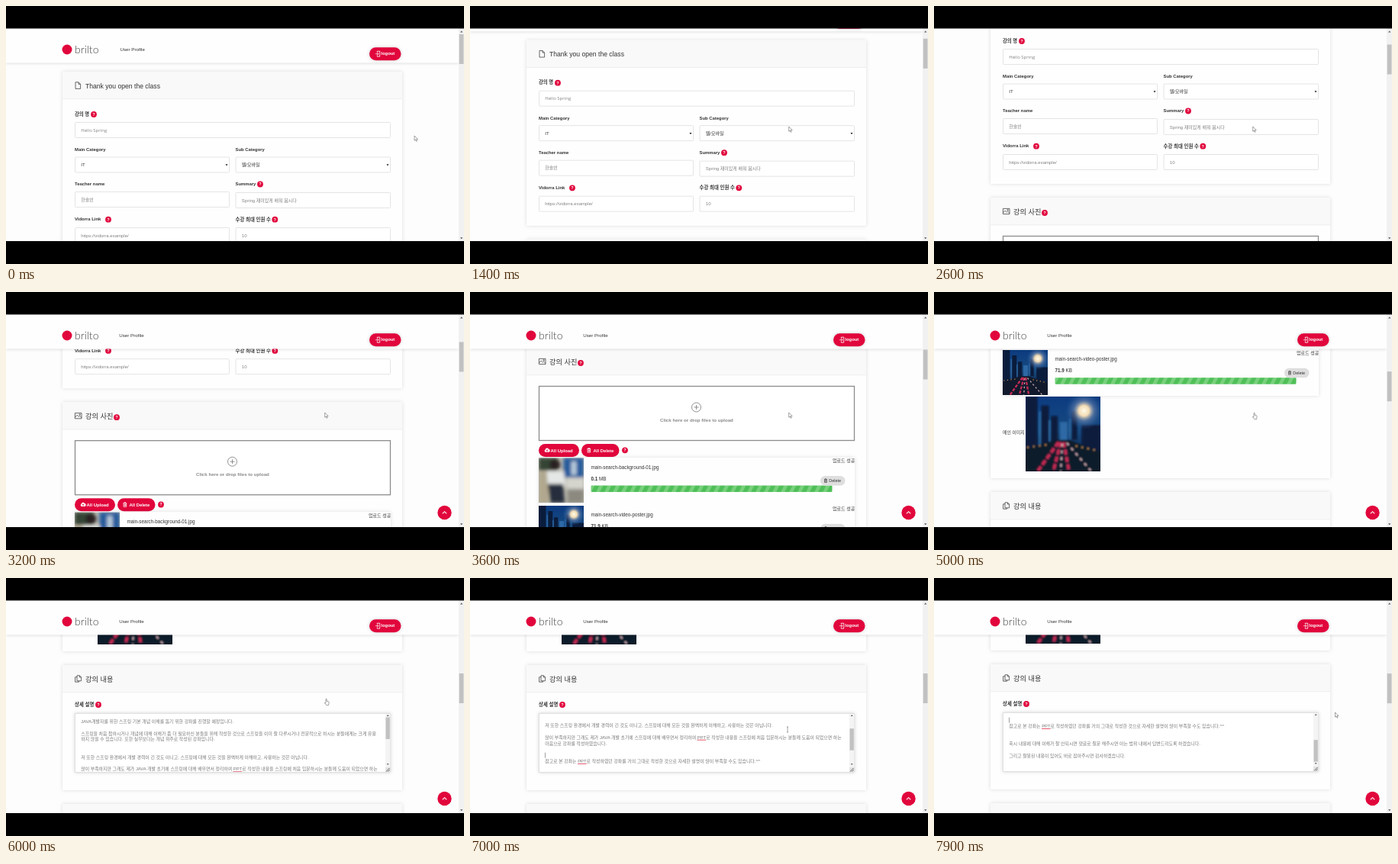
Recreate the animation shown at these times as an HTML page. Size 600 px wide and 338 px high, loop 8000 ms.

```html
<!DOCTYPE html>
<html lang="ko">
<head>
<meta charset="utf-8">
<title>Class form</title>
<style>
  html, body { margin: 0; width: 100%; height: 100%; overflow: hidden; background: #000; }
  svg { display: block; width: 600px; height: 338px; }
  text { font-family: "Liberation Sans", "Noto Sans CJK KR", "Noto Sans CJK", sans-serif; white-space: pre; }
  .card { fill: #fefefe; filter: drop-shadow(0 0 2.5px rgba(0, 0, 0, .13)); }
  .bar { filter: drop-shadow(0 0 2px rgba(0, 0, 0, .18)); }
  .line { fill: none; stroke: #444; stroke-width: .8; }
  .white { fill: none; stroke: #fff; stroke-width: .8; }
  .pointer path { fill: #fff; stroke: #666; stroke-width: .6; stroke-linejoin: round; }
</style>
</head>
<body>
<svg id="stage" viewBox="0 0 600 338"></svg>
<script>
const RED = '#e1063c', INK = '#333', GREY = '#808080';

// Building blocks: y of a text is its vertical middle.
const text = (x, y, str, size = 6.3, fill = INK, extra = '') =>
  `<text x="${x}" y="${y + size * .35}" font-size="${size}" fill="${fill}" ${extra}>${str}</text>`;
const bold = (x, y, str, size = 5.9, fill = INK) => text(x, y, str, size, fill, 'font-weight="700"');
const rect = (x, y, w, h, fill, extra = '') =>
  `<rect x="${x}" y="${y}" width="${w}" height="${h}" fill="${fill}" ${extra}/>`;
const path = (d, cls, extra = '') => `<path d="${d}" class="${cls}" ${extra}/>`;
const at = (x, y, body) => `<g transform="translate(${x} ${y})">${body}</g>`;
const help = (x, y) => `<circle cx="${x}" cy="${y}" r="3.9" fill="${RED}"/>` +
  text(x, y, '?', 5.6, '#fff', 'font-weight="700" text-anchor="middle"');
const box = (x, y, w, value, fill = GREY, font = '') =>
  rect(x + .5, y + .5, w - 1, 20, '#fff', 'rx="1" stroke="#dedede" stroke-width=".8"') +
  text(x + 8.3, y + 10.5, value, 6, fill, font);
const select = (x, y, w, value) =>
  box(x, y, w, value, INK) + path(`M${x + w - 5.5} ${y + 9.8}h3l-1.5 2.2z`, '', 'fill="#222"');
const card = (y, h, icon, title, size) =>
  rect(74, y, 445, h, '', 'class="card" rx="1"') + rect(74, y, 445, 36, '#f9f9f9') +
  rect(74, y + 35.5, 445, .7, '#e9e9e9') + at(90, y + 18, icon) + text(104, y + 18.5, title, size);
const pill = (x, y, w, label, icon) =>
  rect(x, y, w, 17, RED, 'rx="8.5"') + at(x + 7.5, y + 8.5, icon) + bold(x + 15.5, y + 8.5, label, 5.9, '#fff');

const trash = cls => path('M0-2h4.6M1.5-2v-1h1.6v1M.6-2v4.6h3.4v-4.6M1.8-.8v2.2M2.9-.8v2.2', cls);
const page = path('M1-4.2h4l2.6 2.6v6h-6.6zM5-4.2v2.6h2.6', 'line');
const picture = path('M.4-3.6h8.6v7.2h-8.6zM.4 2l2.8-3 2.2 2.2 1.2-1 2.4 2.2', 'line') +
  '<circle cx="6.6" cy="-1.6" r=".8" class="line"/>';
const pages = path('M3-4.2h3.4l2.2 2.2v4.8h-5.6zM6.4-4.2v2.2h2.2M3-2.2h-2.4v6.4h5v-1.4', 'line');
const cloud = path('M1.4 2.2a1.7 1.7 0 0 1-.2-3.2 2.3 2.3 0 0 1 4.3-.7 2 2 0 0 1 .3 3.9z', '', 'fill="#fff"') +
  path('M3.5 1.8v-2.6M2.5.2l1-1 1 1', 'line', `style="stroke:${RED}"`);

const defs = `<defs>
  <pattern id="stripes" width="11" height="9" patternUnits="userSpaceOnUse" y="527">
    <rect width="11" height="9" fill="#4fbf58"/><path d="M4.5 0h5L5 9H0z" fill="#78d07c"/></pattern>
  <linearGradient id="dusk" x2="0" y2="1"><stop stop-color="#0c3b80"/>
    <stop offset=".45" stop-color="#174a80"/><stop offset="1" stop-color="#0a1428"/></linearGradient>
  <radialGradient id="lamp"><stop stop-color="#fffbe8"/><stop offset=".28" stop-color="#f3dcb4"/>
    <stop offset=".55" stop-color="#7189b0" stop-opacity=".6"/><stop offset="1" stop-color="#2a5c9e" stop-opacity="0"/></radialGradient>
  <filter id="soft"><feGaussianBlur stdDeviation="1.3"/></filter>
  <filter id="blur"><feGaussianBlur stdDeviation="4"/></filter>
  <clipPath id="note"><rect x="91" y="804" width="405" height="76"/></clipPath>
  <symbol id="city" viewBox="0 0 100 100">
    <rect width="100" height="100" fill="url(#dusk)"/>
    <g filter="url(#soft)">
      <path d="M0 0h16v72H0zM21 12h10v55H21zM34 26h9v36h-9zM62 20h7v38h-7zM75 38h25v40H75z" fill="#0a1c3c"/>
      <path d="M46 34h10v26H46z" fill="#2d69a5"/>
      <path d="M19 20v44M32 32v28M59 30v27" stroke="#3a78b2" stroke-width="1.5"/>
      <path d="M0 70L40 58H58L100 74V100H0z" fill="#111a2c"/>
      <path d="M44 61L16 100M47 61L37 100M51 61L58 100" stroke="#c42b55" stroke-width="4" stroke-dasharray="7 3"/>
      <path d="M55 62L88 100M49 63L47 100" stroke="#d8b6bd" stroke-width="2" stroke-dasharray="4 5"/>
      <path d="M2 68l30-4M67 66l28 6" stroke="#d89a50" stroke-width="2" stroke-dasharray="2 6"/>
    </g>
    <circle cx="78" cy="19" r="25" fill="url(#lamp)"/>
  </symbol>
  <symbol id="people" viewBox="0 0 100 100">
    <rect width="100" height="100" fill="#b9b8ae"/>
    <g filter="url(#blur)">
      <path d="M0 0h42v28H0z" fill="#344434"/><path d="M55 0h45v44H55z" fill="#265c9c"/>
      <path d="M72 8h12v30H72z" fill="#b9cbd9"/><path d="M0 30h22v70H0z" fill="#b1a78e"/>
      <circle cx="36" cy="15" r="12" fill="#292321"/><path d="M18 30h38l4 32H20z" fill="#e5e7e6"/>
      <path d="M20 58h34l4 42H26z" fill="#252d3e"/><path d="M62 44h38v24H62z" fill="#d5d4cd"/>
      <path d="M64 70h36v30H64z" fill="#8c8a80"/>
    </g>
  </symbol>
</defs>`;

const fileRow = (y, image, name, size, unit) =>
  `<use href="#${image}" x="90" y="${y}" width="59" height="59"/>` +
  text(158.5, y + 12, name) +
  text(158.5, y + 27, `<tspan font-weight="700">${size}</tspan> ${unit}`) +
  at(0, y - 491, rect(158.5, 527.2, 316, 8.6, 'url(#stripes)', 'rx="1"')) +
  text(475, y + 4, '업로드 성공', 6) +
  rect(459, y + 23.7, 32.5, 12.6, '#dedede', 'rx="6.3"') +
  at(464, y + 30, `<g transform="scale(.85)">${trash('line')}</g>`) + text(470.3, y + 30, 'Delete', 5.4);

const noteLines = [
  [0, 'JAVA개발자를 위한 스프링 기본 개념 이해를 돕기 위한 강좌를 진행할 예정입니다.'],
  [2, '스프링을 처음 접하시거나 개념에 대해 이해가 좀 더 필요하신 분들을 위해 작성한 것으로 스프링을 이미 잘 다루시거나 전문적으로 하시는 분들에게는 크게 유용'],
  [3, '하지 않을 수 있습니다. 또한 실무보다는 개념 위주로 작성된 강좌입니다.'],
  [6, '저 또한 스프링 환경에서 개발 경력이 긴 것도 아니고, 스프링에 대해 모든 것을 완벽하게 이해하고, 사용하는 것은 아닙니다.'],
  [8, '많이 부족하지만 그래도 제가 JAVA 개발 초기에 스프링에 대해 배우면서 정리하여 PPT로 작성한 내용을 스프링에 처음 입문하시는 분들께 도움이 되었으면 하는'],
  [9, '마음으로 강좌를 작성하였습니다.'],
  [12, '참고로 본 강좌는 PPT로 작성하였던 강좌를 거의 그대로 작성한 것으로 자세한 설명이 많이 부족할 수도 있습니다.^^'],
  [15, '혹시 내용에 대해 이해가 잘 안되시면 댓글로 질문 해주시면 아는 범위 내에서 답변드리도록 하겠습니다.'],
  [17, '그리고 잘못된 내용이 있어도 바로 잡아주시면 감사하겠습니다.'],
];
const lineY = n => 814 + n * 7.8;
const noteText = noteLines.map(([n, str]) => text(98.3, lineY(n), str, 5.9, '#777')).join('') +
  rect(297.5, lineY(8) + 3, 11.5, .8, '#e0304a') + rect(141, lineY(12) + 3, 11.5, .8, '#e0304a') +
  rect(98.3, lineY(11) - 3.5, .7, 7, '#777');

const openSans = 'style="font-family:\'Open Sans\',sans-serif"';
const content =
  card(86, 243, page, 'Thank you open the class', 8.6) +
  bold(90, 141.5, '강의 명', 6.3) + help(115, 142) + box(90, 152, 414, 'Hello Spring', GREY, openSans) +
  bold(90, 188, 'Main Category') + select(90, 197.5, 203, 'IT') +
  bold(300.5, 188, 'Sub Category') + select(300.5, 197.5, 203.5, '웹/모바일') +
  bold(90, 233.3, 'Teacher name') + box(90, 243, 203, '한솔빈') +
  bold(300.5, 233.3, 'Summary') + help(333, 233.5) + box(300.5, 244, 203.5, 'Spring 재미있게 배워 봅시다') +
  bold(90, 279.3, 'Vidorra Link') + help(134, 279.7) + box(90, 290, 203, 'https://vidorra.example/') +
  bold(300.5, 279.3, '수강 최대 인원 수', 6.4) + help(352.3, 279.7) + box(300.5, 290, 203.5, '10') +

  card(347, 375, picture, '강의 사진', 9.2) + help(145, 367) +
  '<rect id="drop" x="90.5" y="397.5" width="413" height="71" fill="#fff" stroke-width="1.3"/>' +
  '<circle cx="296.5" cy="425" r="6" class="line" style="stroke:#777"/>' +
  path('M293.5 425h6M296.5 422v6', 'line', 'style="stroke:#777"') +
  bold(249, 442, 'Click here or drop files to upload', 6.15, '#8a8a8a') +
  pill(90, 473, 53, 'All Upload', cloud) + pill(146, 473, 49.5, 'All Delete', trash('white')) + help(203, 481.3) +
  rect(90, 491, 414, 123, '', 'class="card"') +
  fileRow(491.3, 'people', 'main-search-background-01.jpg', '0.1', 'MB') +
  fileRow(554, 'city', 'main-search-video-poster.jpg', '71.9', 'KB') +
  text(90, 662, '메인 이미지', 5.9) + '<use href="#city" x="120" y="615" width="98" height="98"/>' +

  card(740, 164, pages, '강의 내용', 9.2) +
  bold(90, 791.3, '상세 설명', 6.4) + help(121, 792) +
  rect(90.5, 803.5, 413, 77, '#fff', 'class="bar" stroke="#ddd" stroke-width=".8"') +
  `<g clip-path="url(#note)"><g id="noteText">${noteText}</g></g>` +
  rect(497, 804, 6.3, 70, '#f4f4f4') + '<rect id="noteThumb" x="497.5" y="808.5" width="5.3" height="28.5" fill="#c1c1c1"/>' +
  path('M498.7 807h3l-1.5-1.8zM498.7 869.3h3l-1.5 1.8z', '', 'fill="#555"') +
  rect(497, 874, 6.3, 6.5, '#e4e4e4') + path('M498 879.5l4.5-4.5M500.3 879.5l2.2-2.2', 'line') +

  card(922, 120, picture, '', 9);

const header = rect(0, 20, 593, 54.5, '#fefefe', 'class="bar"') +
  `<circle cx="80" cy="57" r="6.5" fill="${RED}"/>` +
  text(90, 57.2, 'brilto', 14, '#444', 'font-weight="300" style="font-family:Lato,sans-serif"') +
  '<g id="nav">' + text(149.5, 57.3, 'User Profile', 6.2) + '</g>' +
  `<g class="bar">${rect(476, 54.2, 41.5, 17, RED, 'rx="8.5"')}</g>` +
  path('M486-3', '') + path('M486.3 61v-1.8h3.4v7h-3.4v-1.8M484 62.7h4M486.6 61.3l1.4 1.4-1.4 1.4', 'white') +
  bold(491.3, 62.4, 'logout', 5.9, '#fff');

const stage = document.getElementById('stage');
stage.innerHTML = defs + rect(0, 29, 600, 280, '#fdfdfd') +
  `<g id="content">${content}</g><g id="header">${header}</g>` +
  `<g id="toTop"><circle cx="574.5" cy="289" r="9.2" fill="${RED}"/>` +
  path('M571.8 290.4l2.7-2.7 2.7 2.7', 'white', 'style="stroke-width:1.1"') + '</g>' +
  rect(593, 29, 7, 280, '#f1f1f1') + '<rect id="thumb" x="593.7" y="37" width="5.8" height="39" fill="#c1c1c1"/>' +
  path('M595 34.4h3.4l-1.7-2zM595 303.3h3.4l-1.7 2z', '', 'fill="#555"') +
  '<g id="pointer" class="pointer">' +
  path('M0 0V6.2L1.5 5 2.5 7.3 3.5 6.8 2.5 4.6H4.5Z', '', 'id="arrow"') +
  path('M1.3 4.6V.6q.6-.8 1.2 0V3.4l2.3.5q.7.3.6 1L4.9 8.6H2L-.4 5.6q.2-1 1.7 0z', '', 'id="hand"') +
  path('M-1 0h2M0 0v7M-1 7h2', '', 'id="beam"') + '</g>' +
  rect(0, 0, 600, 29.5, '#000') + rect(0, 308, 600, 30, '#000');

const $ = id => document.getElementById(id);
const move = (id, x, y) => $(id).setAttribute('transform', `translate(${x} ${y})`);
const show = (id, opacity) => $(id).setAttribute('opacity', Number(opacity));

// Linear interpolation through [time, value] points, held at both ends.
function track(points, t) {
  const i = points.findIndex(p => p[0] > t);
  if (i === 0) return points[0][1];
  if (i < 0) return points[points.length - 1][1];
  const [t0, v0] = points[i - 1], [t1, v1] = points[i];
  return v0 + (v1 - v0) * (t - t0) / (t1 - t0);
}

const scrollTrack = [[1200, 0], [1500, 62], [1900, 62], [2600, 96], [3600, 274], [4500, 392],
  [5000, 478], [5500, 625], [5600, 625], [5700, 626], [7600, 626], [7700, 627]];
const noteTrack = [[6500, 0], [6800, 31.2], [6900, 31.2], [7200, 62.5], [7300, 62.5], [7500, 86.6]];
const pointerX = [[100, 535], [300, 530], [400, 530], [700, 505], [800, 505], [900, 417.7],
  [6300, 417.7], [6400, 416], [7600, 416], [7900, 525.5]];
const pointerY = [[100, 170], [300, 168], [400, 168], [700, 164], [800, 164], [900, 158],
  [6300, 158], [6400, 195], [7600, 195], [7900, 176]];

function draw(t) {
  const scroll = track(scrollTrack, t), note = track(noteTrack, t), sticky = t > 2700;
  move('content', 0, -scroll);
  move('header', 0, sticky ? 0 : -scroll);
  show('header', sticky ? track([[2800, 0], [3000, 1]], t) : 1);
  move('nav', sticky ? -1.2 : 0, 0);
  show('toTop', track([[2900, 0], [3200, 1]], t));
  move('thumb', 0, scroll * .1406);
  move('noteText', 0, -note);
  move('noteThumb', 0, note * .354);

  const hovered = t >= 3700;
  $('drop').setAttribute('stroke', hovered ? '#4cb84c' : '#8c8c8c');
  $('drop').setAttribute('stroke-dasharray', hovered ? '2.5 1.5' : 'none');

  move('pointer', track(pointerX, t), track(pointerY, t));
  const shape = t >= 3700 && t < 6400 ? 'hand' : t >= 6400 && t < 7800 ? 'beam' : 'arrow';
  for (const id of ['arrow', 'hand', 'beam']) show(id, id === shape);
}

function tick() {
  draw(Math.floor(performance.now() % 8000 / 100) * 100);
  requestAnimationFrame(tick);
}
tick();
</script>
</body>
</html>
```
